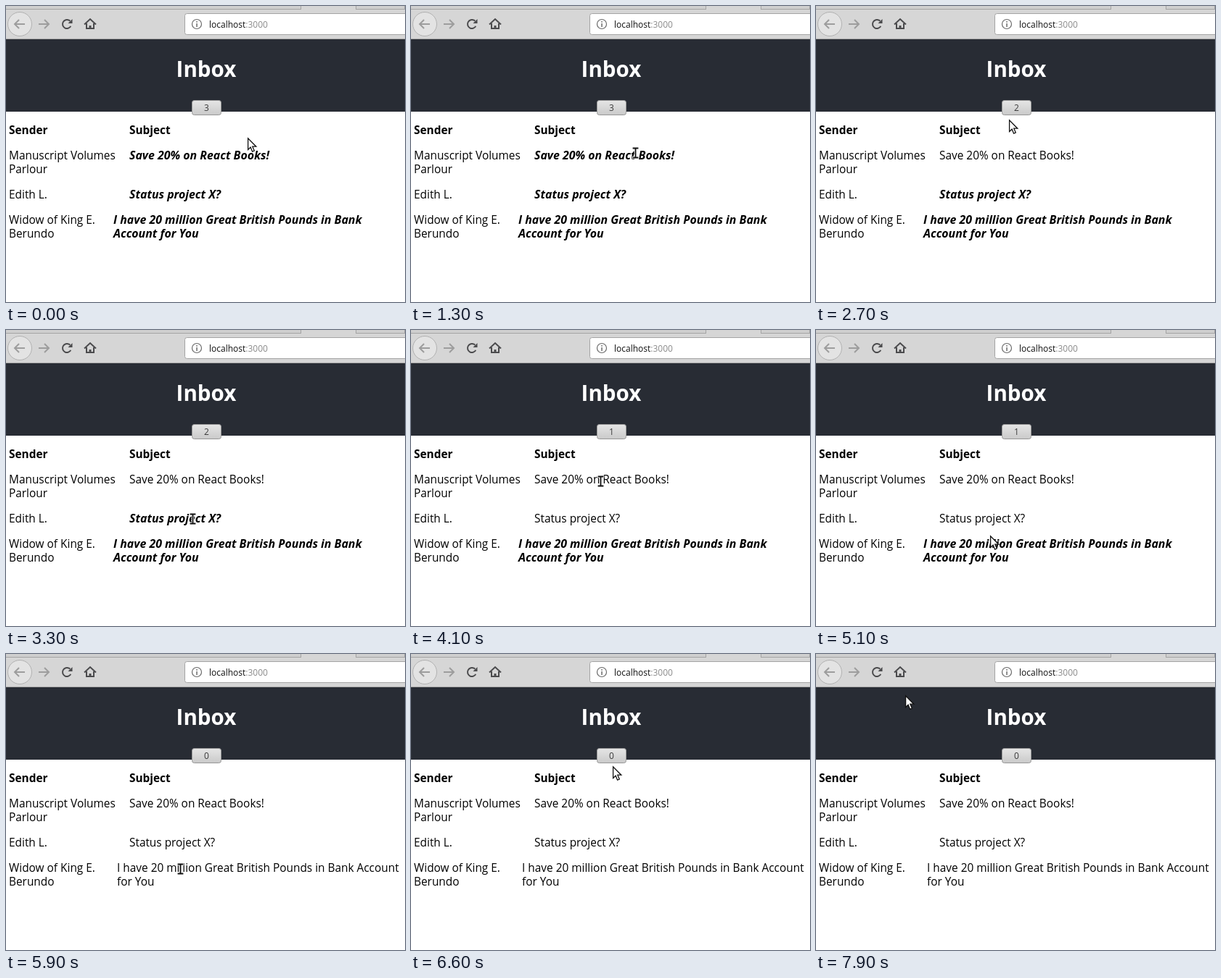
An HTML page with a canvas for the animation above (8000 ms loop, 550 px wide and 409 px high).

```html
<!DOCTYPE html>
<html lang="en">
<head>
<meta charset="utf-8">
<title>Inbox</title>
<style>
  html, body { margin: 0; width: 100%; height: 100%; overflow: hidden; background: #fff; }
  canvas { display: block; width: 550px; height: 409px; }
</style>
</head>
<body>
<canvas id="stage"></canvas>
<script>
const W = 550, H = 409, LOOP = 8000, STEP = 100;
const LINE = 19, ROW_GAP = 16;
const FONT = '"Open Sans", "Noto Sans", sans-serif';
const PLAIN = { size: 15.4 };
const BOLD = { size: 15.4, style: 'bold' };
const UNREAD = { size: 15.9, style: 'italic bold' };
const INK = '#4b4b4d', PALE = '#9d9d9d', EDGE = '#a4a4a4';

const canvas = document.getElementById('stage');
const ctx = canvas.getContext('2d');
const dpr = window.devicePixelRatio || 1;
canvas.width = W * dpr;
canvas.height = H * dpr;

const MAILS = [
  { from: 'Manuscript Volumes Parlour', subject: 'Save 20% on React Books!', readAt: 1800 },
  { from: 'Edith L.', subject: 'Status project X?', readAt: 3700 },
  { from: 'Widow of King E. Berundo', readAt: 5900, unreadX: 148, readX: 153,
    subject: 'I have 20 million Great British Pounds in Bank Account for You' }
];

// Each pointer move: first step, last step, end point
const START = { x: 333, y: 182 };
const MOVES = [
  { from: 800, to: 1300, x: 309, y: 203 },
  { from: 2200, to: 2300, x: 266, y: 157 },
  { from: 3000, to: 3300, x: 257, y: 261 },
  { from: 3900, to: 4100, x: 261, y: 209 },
  { from: 4200, to: 4600, x: 262, y: 150 },
  { from: 4900, to: 5100, x: 240, y: 284 },
  { from: 5200, to: 5300, x: 240, y: 297 },
  { from: 6200, to: 6600, x: 278, y: 155 },
  { from: 7500, to: 7900, x: 123, y: 57 }
];

function setFont({ size, style = '' }) {
  ctx.font = `${style} ${size}px ${FONT}`;
}

// Draws a line of text and returns its width
function text(str, x, y, font, color = '#000', align = 'left') {
  setFont(font);
  ctx.fillStyle = color;
  ctx.textAlign = align;
  ctx.fillText(str, x, y);
  return ctx.measureText(str).width;
}

function wrap(str, width, font) {
  setFont(font);
  const lines = [''];
  for (const word of str.split(' ')) {
    const last = lines.length - 1;
    const longer = (lines[last] + ' ' + word).trim();
    if (ctx.measureText(longer).width <= width) lines[last] = longer;
    else lines.push(word);
  }
  return lines;
}

function rect(x, y, w, h, color) {
  ctx.fillStyle = color;
  ctx.fillRect(x, y, w, h);
}

function path(points, closed) {
  ctx.beginPath();
  points.forEach(([x, y]) => ctx.lineTo(x, y));
  if (closed) ctx.closePath();
}

function fill(color) {
  ctx.fillStyle = color;
  ctx.fill();
}

function stroke(color, width = 1) {
  ctx.strokeStyle = color;
  ctx.lineWidth = width;
  ctx.stroke();
}

function box(x, y, w, h, inside, line) {
  ctx.beginPath();
  ctx.roundRect(x, y, w, h, 3);
  fill(inside);
  stroke(line);
}

function circle(x, y, r) {
  ctx.beginPath();
  ctx.arc(x, y, r, 0, Math.PI * 2);
}

function at(x, y, draw) {
  ctx.save();
  ctx.translate(x, y);
  draw();
  ctx.restore();
}

function navArrow(dir) {
  path([[-7 * dir, 0], [7 * dir, 0]]);
  stroke(PALE, 2);
  path([[dir, -6], [7 * dir, 0], [dir, 6]]);
  stroke(PALE, 2);
}

function reloadIcon() {
  ctx.beginPath();
  ctx.arc(0, 0, 6, 0.5, Math.PI * 1.75);
  stroke(INK, 2);
  path([[7.5, -7], [7.5, -1], [1.5, -1]], true);
  fill(INK);
}

function homeIcon() {
  path([[-8, 0.5], [0, -7], [8, 0.5]]);
  stroke(INK, 2);
  path([[-5, -1], [-5, 6], [5, 6], [5, -1]]);
  stroke(INK, 2);
  rect(-1.5, 2, 3, 4, INK);
}

function infoIcon() {
  circle(0, 0, 6.5);
  stroke('#6b6b6b', 1.2);
  rect(-0.7, -1, 1.5, 5, '#6b6b6b');
  rect(-0.7, -4, 1.5, 1.7, '#6b6b6b');
}

function drawToolbar() {
  rect(0, 0, W, 46, '#d6d6d6');
  for (const [left, right] of [[0, 407], [482, W]]) {
    rect(left, 0, right - left, 5, EDGE);
    rect(left, 0, right - left - 1, 4, '#cfcfcf');
  }
  rect(482, 0, 1, 5, EDGE);
  rect(0, 45, W, 1, EDGE);

  circle(19, 25, 16.5);
  fill('#e3e3e3');
  stroke('#b1b1b1');
  at(19, 25, () => navArrow(-1));
  at(52, 25, () => navArrow(1));
  at(84, 25, reloadIcon);
  at(116, 25, homeIcon);

  box(246.5, 10.5, W, 29, '#fff', EDGE);
  at(263, 25, infoIcon);
  const host = text('localhost', 280, 30, { size: 12 }, '#111');
  text(':3000', 280 + host, 30, { size: 12 }, '#8b8b8b');
}

function drawHeader(t) {
  rect(0, 46, W, 100, '#282c34');
  text('Inbox', 276, 98, { size: 29.6, style: 'bold' }, '#fff', 'center');
  const shade = ctx.createLinearGradient(0, 130, 0, 151);
  shade.addColorStop(0, '#e6e6e6');
  shade.addColorStop(1, '#c9c9c9');
  box(256.5, 130.5, 40, 20, shade, '#979797');
  const unread = MAILS.filter(m => t < m.readAt).length;
  text(unread, 276.5, 145, { size: 12 }, '#3c3c3c', 'center');
}

// Draws the list and returns the areas covered by subject lines
function drawMails(t) {
  const areas = [];
  text('Sender', 4, 177, BOLD);
  text('Subject', 170, 177, BOLD);
  let y = 212;
  for (const { from, subject, readAt, unreadX = 170, readX = 170 } of MAILS) {
    const unread = t < readAt;
    const font = unread ? UNREAD : PLAIN;
    const x = unread ? unreadX : readX;
    const sender = wrap(from, 150, PLAIN);
    sender.forEach((s, i) => text(s, 4, y + i * LINE, PLAIN));
    const lines = wrap(subject, W - 4 - x, font);
    lines.forEach((s, i) => {
      const base = y + i * LINE;
      const width = text(s, x, base, font);
      areas.push({ left: x, right: x + width, top: base - 15, bottom: base + 5 });
    });
    y += Math.max(sender.length, lines.length) * LINE + ROW_GAP;
  }
  return areas;
}

function pointerAt(t) {
  let { x, y } = START;
  for (const move of MOVES) {
    if (t < move.from) break;
    const steps = (move.to - move.from) / STEP + 1;
    const p = Math.min(1, (Math.floor((t - move.from) / STEP) + 1) / steps);
    const eased = p * (2 - p);
    x += (move.x - x) * eased;
    y += (move.y - y) * eased;
  }
  return [Math.round(x), Math.round(y)];
}

function arrowPointer() {
  path([[0.6, 0.8], [0.6, 16.4], [4.1, 13.2], [6.6, 19.2], [9.3, 18], [6.8, 12.2], [11.8, 12.2]], true);
  fill('#fff');
  stroke('#111', 1.3);
}

function beamPointer() {
  ctx.beginPath();
  for (const y of [-6.5, 6.5]) {
    ctx.moveTo(-2.5, y);
    ctx.lineTo(3.5, y);
  }
  ctx.moveTo(0.5, -6.5);
  ctx.lineTo(0.5, 6.5);
  ctx.lineCap = 'square';
  stroke('#fff', 3.6);
  stroke('#111', 1.8);
}

function drawPointer(t, areas) {
  const [x, y] = pointerAt(t);
  const overText = areas.some(a => x >= a.left && x <= a.right && y >= a.top && y <= a.bottom);
  at(x, y, overText ? beamPointer : arrowPointer);
}

const origin = performance.now();

function frame() {
  const t = (performance.now() - origin) % LOOP;
  ctx.setTransform(dpr, 0, 0, dpr, 0, 0);
  rect(0, 0, W, H, '#fff');
  drawToolbar();
  drawHeader(t);
  drawPointer(t, drawMails(t));
  requestAnimationFrame(frame);
}
frame();
</script>
</body>
</html>
```
